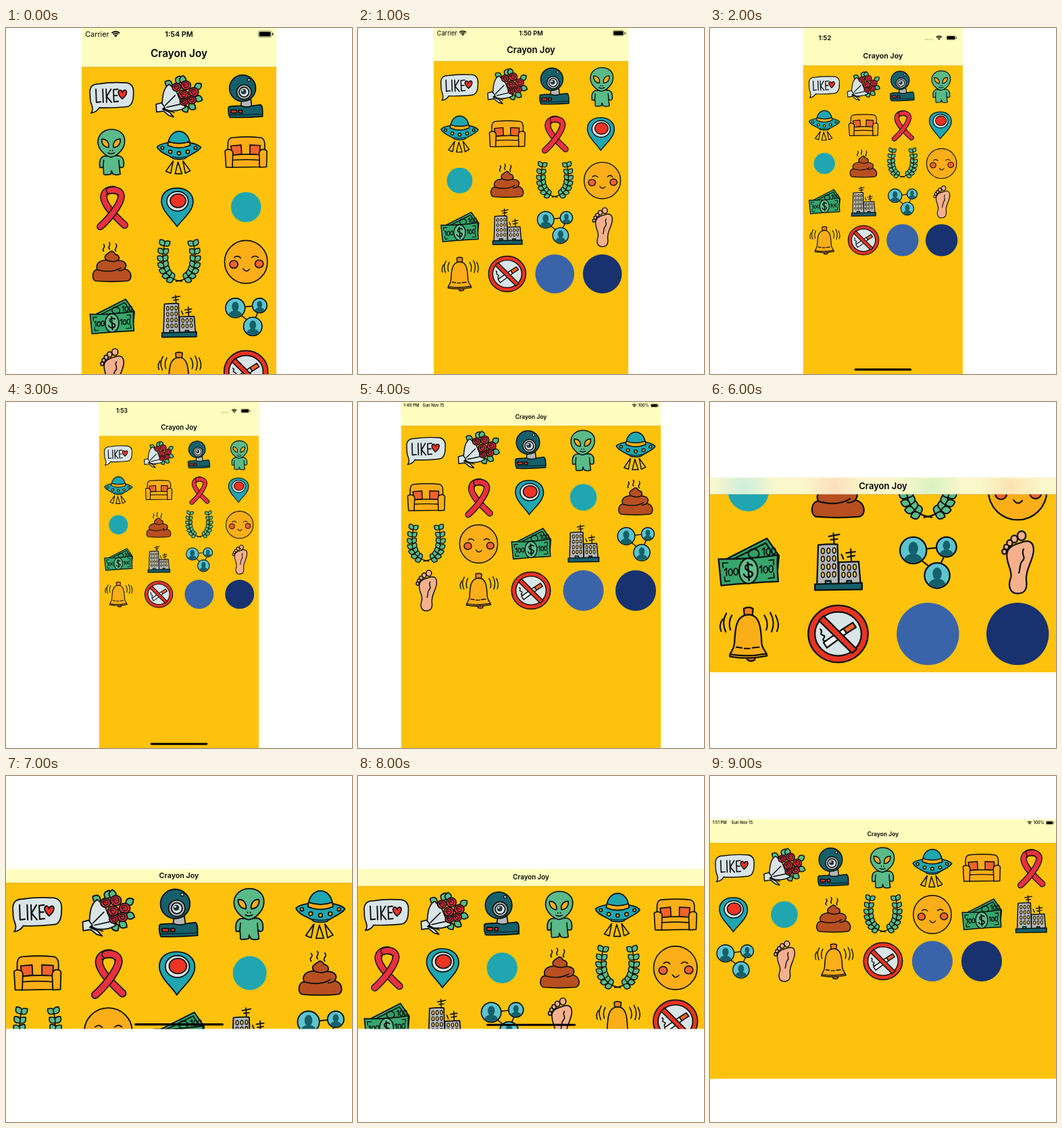
An HTML page with a canvas for the animation above (10 s loop, 512 by 512 pixels).

```html
<!DOCTYPE html>
<html lang="en">
<head>
<meta charset="utf-8">
<title>Doodle grid on several devices</title>
<style>
  html, body { margin: 0; width: 100%; height: 100%; overflow: hidden; background: #fff; }
  canvas { display: block; width: 512px; height: 512px; }
</style>
</head>
<body>
<canvas id="stage" width="512" height="512"></canvas>
<script>
const ctx = document.getElementById('stage').getContext('2d');
const TITLE = 'Crayon Joy';
const INK = '#0b0f0e', PAPER = '#fec20c', BAR = '#fffebf';
const WHITE = '#d8e4e6', RED = '#e8303f', TEAL = '#1fa6b0', DARK = '#15606a',
      GREEN = '#5aba88', ORANGE = '#fcae18', RUST = '#f2632b', GREY = '#b4b6b8';

// ---- Path helpers: every icon lives in a box from -50 to 50 ----
const oval = (x, y, rx, ry = rx) =>
  `M${x - rx} ${y}a${rx} ${ry} 0 1 0 ${2 * rx} 0a${rx} ${ry} 0 1 0 ${-2 * rx} 0z`;

function leaf(x, y, angle, length = 15, width = 11) {
  const c = Math.cos(angle), s = Math.sin(angle);
  const at = (u, v) => `${x + u * c - v * s} ${y + u * s + v * c}`;
  return `M${at(0, 0)}Q${at(length / 2, -width)} ${at(length, 0)}Q${at(length / 2, width)} ${at(0, 0)}z`;
}

// A shape is [path, fill, stroke colour, stroke width].
const line = (d, width = 2.2) => [d, null, INK, width];
const flat = (d, fill) => [d, fill, null];
const disc = (color, r) => [flat(oval(0, 0, r), color)];
const band = (d, color, width) => [line(d, width + 4), [d, null, color, width]];

const rose = (x, y, r) => [
  [oval(x, y, r, r * .92), RED],
  line(`M${x - r * .6} ${y}c0 ${-r * .8} ${r * 1.2} ${-r * .7} ${r * 1.1} 0c0 ${r * .7} ${-r} ${r * .6} ${-r * .9} 0q${r * .3} ${-r * .4} ${r * .5} 0`, 1.8)
];
const person = (x, y, r) => [
  [oval(x, y, r), '#5cc4ce'],
  flat(`M${x - r * .68} ${y + r * .66}Q${x - r * .5} ${y + r * .25} ${x} ${y + r * .25}T${x + r * .68} ${y + r * .66}Q${x} ${y + r * 1.2} ${x - r * .68} ${y + r * .66}z`, DARK),
  flat(oval(x, y - r * .15, r * .36, r * .5), DARK)
];
const hundred = (x, y) => line(`M${x - 9} ${y - 3}l3 -3v11${oval(x, y, 3, 5)}${oval(x + 8, y - 1, 3, 5)}`, 1.8);

function laurel() {
  const shapes = [];
  for (const side of [-1, 1]) {
    shapes.push(line(`M${-6 * side} 40Q${44 * side} 34 ${30 * side} -36`));
    for (let i = 0; i < 7; i++) {
      const t = .2 + i * .13, q = 1 - t;
      const x = -6 * q * q + 88 * t * q + 30 * t * t;
      const y = 40 * q * q + 68 * t * q - 36 * t * t;
      const heading = Math.atan2(2 * (q * -6 + t * -70), 2 * (q * 50 + t * -14));
      for (const turn of [-.75, .75]) {
        const a = heading + turn;
        shapes.push([leaf(x * side, y, side > 0 ? a : Math.PI - a), GREEN, INK, 2]);
      }
    }
  }
  return shapes;
}

function windows(x, y, columns, rows, dx, dy) {
  let d = '';
  for (let r = 0; r < rows; r++)
    for (let c = 0; c < columns; c++) d += oval(x + c * dx, y + r * dy - c * .4, 2.4, 4);
  return [d, '#eec968', INK, 1.6];
}

const icons = [
  // speech bubble
  [
    ['M-45 -6C-47 -22 -40 -28 -26 -28C-8 -31 14 -31 30 -30C42 -28 45 -20 44 -8C44 8 40 18 30 19C10 21 -8 22 -26 21C-30 28 -36 31 -43 32C-38 26 -40 20 -42 14C-45 8 -45 0 -45 -6z', WHITE],
    line('M-33 -17L-32 10L-23 9M-19 -17L-18 10M-12 -17L-11 10M-2 -17L-11 -2L-1 10M12 -17L3 -16L4 9L13 8M4 -4L11 -4', 2.6),
    ['M21 3C14 -4 11 -10 14 -14C17 -17 21 -14 21 -10C23 -16 29 -17 30 -11C30 -5 25 0 21 3z', '#ee3424']
  ],
  // bouquet
  [
    ...[[-4, -28, -1.2], [-14, -24, -2.6], [8, -28, -1.6], [32, -18, -.6], [32, 0, .3], [20, 14, .6], [8, 16, 1]]
      .map(([x, y, a]) => [leaf(x, y, a, 17, 13), GREEN]),
    ['M-35 18C-34 0 -33 -20 -20 -27L-6 -14L4 10L14 20C2 28 -10 28 -24 27z', WHITE],
    ['M-47 14L-36 11L-29 20L-34 24L-20 30L-11 40L-21 37L-32 28L-46 30z', WHITE],
    line('M-28 16L-8 -4M-25 20L2 14M-32 23L-10 31'),
    ...rose(-5, -21, 9), ...rose(14, -25, 10), ...rose(30, -11, 10),
    ...rose(9, -6, 10), ...rose(26, 5, 9), ...rose(10, 9, 8)
  ],
  // webcam
  [
    ['M-9 5L10 4L12 20L-11 20z', GREY],
    [oval(-7, -19, 27), DARK],
    [oval(-4, -11, 15), GREY],
    [oval(-4, -11, 10), WHITE],
    flat(oval(-5, -12, 5.5), '#27343a'), flat(oval(-7, -14, 2), WHITE),
    [oval(6, -36, 3), GREY, INK, 1.5],
    ['M-36 22C-37 17 -28 18 -10 17Q0 22 13 17L30 15C35 18 34 28 34 39Q0 42 -33 41Q-37 34 -36 22z', DARK],
    ['M-31 26l12 0v6l-12 0z', '#ee3424'], ['M-15 26h7v6h-7z', '#ee3424'],
    line('M-34 36Q0 36 32 34', 1.4)
  ],
  // alien
  [
    ['M-17 8C-27 12 -26 24 -25 31Q-20 33 -18 29L-17 42Q-19 47 -10 46L-2 45L-1 38L2 45Q10 48 17 45L15 29Q20 34 24 29C25 18 24 10 14 7z', GREEN],
    ['M-2 10C-14 8 -28 -6 -29 -20C-29 -38 -15 -47 -1 -47C14 -47 27 -38 26 -22C26 -8 12 8 -2 10z', GREEN],
    ['M-7 -10C-16 -10 -22 -18 -21 -27C-12 -28 -5 -20 -7 -10z', ORANGE],
    ['M3 -10C1 -20 8 -28 17 -27C18 -18 13 -10 3 -10z', ORANGE],
    line('M-8 1Q-2 5 5 1M-4 -4v1M1 -4v1M-17 16L-18 29M14 16L15 29')
  ],
  // flying saucer
  [
    ['M-12 18L-27 39L-17 43z', PAPER], ['M-2 20L-8 44L6 44z', PAPER], ['M8 18L13 43L23 38z', PAPER],
    ['M-45 -11C-34 -24 30 -26 45 -10C40 0 18 6 12 13Q0 16 -12 13C-18 6 -40 2 -45 -11z', TEAL],
    ['M-22 -16C-22 -34 -10 -43 0 -43C12 -43 22 -32 22 -16Q0 -6 -22 -16z', TEAL],
    ['M-22 -22Q0 -14 22 -22L23 -14Q0 -4 -23 -14z', ORANGE],
    [[-34, 34].map(x => oval(x, -9, 3)).join('') + [-18, 18].map(x => oval(x, -1, 3.5)).join('') + oval(0, 2, 3.5), PAPER],
    line('M-14 9Q0 13 14 9', 1.6)
  ],
  // sofa
  [
    ['M-37 0C-38 -20 -38 -29 -28 -30Q4 -33 30 -30C40 -28 39 -16 38 2L34 20L-34 20z', ORANGE],
    ['M-31 -13L-10 -15L-9 4L-28 6z', RUST], ['M8 -15L29 -14L28 6L8 4z', RUST],
    ['M-28 6Q0 3 28 5L28 30L-28 31z', ORANGE], line('M-28 16Q0 14 28 16'),
    ['M-43 -3C-38 -8 -27 -6 -27 2L-28 31L-41 31z', ORANGE],
    ['M27 2C28 -8 40 -8 43 -2L42 30L28 31z', ORANGE]
  ],
  // ribbon
  [
    ...band('M26 37C10 22 -16 -2 -17 -20C-16 -34 -4 -37 4 -36', RED, 11),
    ...band('M-24 40C-10 28 18 -4 19 -22C18 -34 6 -37 -5 -34', RED, 11),
    line('M-12 -25Q2 -32 14 -24', 1.6)
  ],
  // map pin
  [
    ['M-4 40C-14 24 -36 8 -36 -12C-36 -30 -22 -39 -4 -39C16 -39 29 -27 29 -11C29 8 8 24 -4 40z', TEAL],
    [oval(-3, -12, 22, 20), WHITE], [oval(-2, -13, 16, 14), '#ee3424']
  ],
  disc(TEAL, 31),
  // swirl
  [
    ['M-30 16C-35 4 -26 -3 -12 -4C-20 -14 -6 -18 -2 -22Q4 -22 6 -16C16 -14 16 -6 12 -3C28 -3 32 6 26 14C42 18 42 37 32 39Q0 42 -34 39C-43 34 -40 16 -30 16z', '#b84f20'],
    line('M-12 -4Q0 2 12 -3M-30 16Q0 24 18 12M26 14Q22 18 14 18'),
    line('M-17 -22c-6 -6 6 -7 0 -14M-5 -26c-6 -5 5 -8 -1 -14M8 -22c-6 -6 6 -7 0 -15')
  ],
  laurel(),
  // smiling face
  [
    [oval(0, 0, 44), ORANGE],
    [oval(-25, 5, 8.5, 8), RUST], [oval(27, 4, 8.5, 8), RUST],
    line('M-24 -9Q-17 -15 -11 -8M12 -9Q19 -15 25 -9M-6 14Q0 23 7 15')
  ],
  // banknotes
  [
    ['M-37 -3L28 -36L46 -10L44 12L-20 18z', '#2f9f66'],
    line('M-24 -4L26 -29L38 -11'), line(oval(8, -13, 8, 7)), hundred(30, -16),
    ['M-45 -5Q0 -4 44 -11Q43 10 45 29Q0 31 -41 35Q-43 14 -45 -5z', '#35a76c'],
    [oval(0, 13, 14, 19), '#63bd8c'],
    line('M6 5C2 1 -7 4 -4 10C0 15 8 13 6 19C3 25 -5 23 -7 18M-1 0L1 27', 2.6),
    hundred(-27, 15), hundred(26, 11),
    line('M-38 8L-39 1L-31 1M31 -3L38 -4L38 4M-36 22L-35 29L-28 28M30 24L39 23L38 16', 1.8)
  ],
  // buildings
  [
    line('M-6 -27L-7 -44M-14 -39L2 -42M-11 -34L-1 -35M20 -1L19 -20M12 -14L26 -16M14 -8L25 -10'),
    line('M5 -12L8 -5'),
    ['M-30 -26Q-14 -28 -1 -27L1 36L-32 37z', GREY],
    ['M1 0L31 -1L34 35L1 36z', GREY],
    windows(-23, -17, 3, 4, 8.5, 12), windows(8, 8, 3, 2, 8.5, 11),
    ['M-19 38v-10h8v10z', TEAL], ['M13 37v-9h7v9z', TEAL],
    ['M-35 33L36 31L36 41L-35 42z', DARK]
  ],
  // network
  [
    line('M-4 -20L14 -22M-10 -3L3 7M24 -8L19 3'),
    ...person(-22, -18, 20), ...person(28, -23, 15), ...person(14, 20, 19)
  ],
  // foot
  [
    ['M-16 -14C-18 2 -8 10 -10 22C-16 38 -10 47 0 47C11 47 15 40 13 26C12 10 22 0 24 -16C25 -32 16 -34 6 -30C-4 -27 -14 -24 -16 -14z', '#f6b08c'],
    line('M9 -20C4 -12 14 -8 7 -2C3 2 4 10 2 16'),
    ...[[6, -40, 7], [-5, -35, 5.5], [-12, -29, 4.6], [-17, -23, 4], [-20, -16, 3.8]]
      .map(([x, y, r]) => [oval(x, y, r * .9, r), '#f6b08c'])
  ],
  // bell
  [
    [oval(4, 37, 6, 4), RUST],
    ['M-6 -28L-7 -38Q0 -42 7 -38L6 -28z', '#f0821e'],
    ['M-21 14C-20 -8 -19 -28 0 -29C17 -29 19 -10 20 14C21 24 28 27 28 33Q0 39 -28 34C-29 28 -22 26 -21 14z', ORANGE],
    line('M-18 20l8 1M-6 22l8 0M6 21l10 -1M-26 31Q0 35 26 30'),
    line('M-25 -28Q-31 -17 -27 -6M-33 -31Q-41 -18 -34 -3M-39 -22Q-45 -12 -41 -4M24 -28Q31 -17 27 -6M33 -32Q41 -18 35 -3M41 -28Q48 -14 43 -4')
  ],
  // no smoking
  [
    [oval(0, 0, 45, 43), '#e63422'], [oval(0, 0, 35, 33), WHITE],
    ['M-22 13L8 -8L13 -1L-17 21z', '#f5f8f8'], ['M8 -8L22 -17L27 -10L13 -1z', RUST],
    line('M-19 11c-10 -2 4 -7 -4 -9c-7 -2 2 -6 -4 -9'),
    ['M-29 -20L-22 -27L28 23L21 29z', '#e63422']
  ],
  disc('#3a64a9', 47),
  disc('#17326f', 47)
];

function drawIcon(shapes, x, y, size) {
  ctx.save();
  ctx.translate(x, y);
  ctx.scale(size / 100, size / 100);
  ctx.lineCap = ctx.lineJoin = 'round';
  for (const [d, fill, stroke = INK, width = 2.3] of shapes) {
    const path = new Path2D(d);
    if (fill) { ctx.fillStyle = fill; ctx.fill(path); }
    if (stroke) { ctx.strokeStyle = stroke; ctx.lineWidth = width; ctx.stroke(path); }
  }
  ctx.restore();
}

// ---- Device chrome, in points ----
function label(text, x, y, size, weight = 400, align = 'center') {
  ctx.font = `${weight} ${size}px Inter, sans-serif`;
  ctx.textAlign = align;
  ctx.textBaseline = 'middle';
  ctx.fillStyle = '#000';
  ctx.fillText(text, x, y + .5);
}
function pill(x, y, w, h, r = h / 2) {
  ctx.beginPath();
  ctx.roundRect(x, y, w, h, r);
}
function battery(x, y) {
  ctx.strokeStyle = 'rgba(0,0,0,.4)';
  ctx.lineWidth = 1;
  pill(x, y - 5.5, 22, 11, 3); ctx.stroke();
  ctx.fillStyle = '#000';
  pill(x + 1.5, y - 4, 19, 8, 1.8); ctx.fill();
  pill(x + 23, y - 2, 1.5, 4, .7); ctx.fill();
}
function wifi(x, y) {
  ctx.strokeStyle = ctx.fillStyle = '#000';
  ctx.lineWidth = 2;
  ctx.lineCap = 'butt';
  for (const r of [6, 9.2]) {
    ctx.beginPath(); ctx.arc(x, y + 5, r, -2.36, -.78); ctx.stroke();
  }
  ctx.beginPath(); ctx.moveTo(x, y + 5); ctx.arc(x, y + 5, 3.6, -2.36, -.78); ctx.fill();
}

const status = {
  classic({ w, time }) {
    label('Carrier', 6, 10, 12, 400, 'left');
    wifi(56, 10);
    label(time, w / 2, 10, 12, 600);
    battery(w - 30, 10);
  },
  notch({ w, time }) {
    const inset = w > 400 ? 0 : 8;
    label(time, 59 - inset, 23, 15, 600);
    ctx.fillStyle = 'rgba(0,0,0,.3)';
    for (let i = 0; i < 4; i++) { pill(w - 97 + inset + i * 5, 25.5, 3, 3); ctx.fill(); }
    wifi(w - 64 + inset, 23);
    battery(w - 47 + inset, 23);
  },
  tablet({ w, time }) {
    label(time, 7, 10.5, 12, 500, 'left');
    label('Sun Nov 15', 63, 10.5, 12, 500, 'left');
    wifi(w - 78, 10.5);
    label('100%', w - 51, 10.5, 12, 500);
    battery(w - 30, 10.5);
  }
};

const screens = [
  { w: 320, h: 568, nav: 64, titleY: 42, bar: 'classic', time: '1:54 PM' },
  { w: 375, h: 667, nav: 64, titleY: 42, bar: 'classic', time: '1:50 PM' },
  { w: 375, h: 812, nav: 88, titleY: 66, bar: 'notch', time: '1:52', home: 134 },
  { w: 414, h: 896, nav: 88, titleY: 66, bar: 'notch', time: '1:53', home: 148 },
  { w: 768, h: 1024, nav: 70, titleY: 45, bar: 'tablet', time: '1:49 PM' },
  { w: 568, h: 320, nav: 32, titleY: 16 },
  { w: 667, h: 375, nav: 32, titleY: 16, atEnd: true },
  { w: 812, h: 375, nav: 32, titleY: 16, home: 209 },
  { w: 896, h: 414, nav: 44, titleY: 22, home: 231 },
  { w: 1024, h: 768, nav: 70, titleY: 45, bar: 'tablet', time: '1:51 PM' }
];

// Colours of scrolled icons shining through the bar: [centre as share of width, colour]
const glows = [[.1, '160,230,240'], [.36, '255,195,170'], [.64, '185,235,185'], [.87, '255,205,150']];

function drawGrid({ w, h, nav, atEnd }) {
  const gap = 10, size = w < 500 ? 80 : 128, step = size + gap;
  const columns = Math.floor((w - gap) / step);
  const stepX = (w - 2 * gap - size) / (columns - 1);
  const contentEnd = nav + gap + Math.ceil(icons.length / columns) * step;
  const top = nav + gap + size / 2 - (atEnd ? contentEnd - h : 0);
  icons.forEach((icon, i) => drawIcon(icon,
    gap + size / 2 + (i % columns) * stepX, top + Math.floor(i / columns) * step, size));
}

function drawScreen(screen) {
  const { w, h, nav, titleY, bar, home, atEnd } = screen;
  const scale = 512 / Math.max(w, h);
  ctx.fillStyle = '#fff';
  ctx.fillRect(0, 0, 512, 512);
  ctx.save();
  ctx.translate(256 - w * scale / 2, 256 - h * scale / 2);
  ctx.scale(scale, scale);
  ctx.beginPath();
  ctx.rect(0, 0, w, h);
  ctx.clip();

  ctx.fillStyle = PAPER;
  ctx.fillRect(0, 0, w, h);
  drawGrid(screen);

  ctx.fillStyle = atEnd ? '#faf8cb' : BAR;
  ctx.fillRect(0, 0, w, nav);
  if (atEnd) for (const [share, rgb] of glows) {
    const x = w * share, glow = ctx.createRadialGradient(x, nav / 2, 0, x, nav / 2, 62);
    glow.addColorStop(0, `rgba(${rgb},.5)`);
    glow.addColorStop(1, `rgba(${rgb},0)`);
    ctx.fillStyle = glow;
    ctx.fillRect(0, 0, w, nav);
  }
  ctx.fillStyle = 'rgba(0,0,0,.25)';
  ctx.fillRect(0, nav, w, .6);
  label(TITLE, w / 2, titleY, 17, 600);
  if (bar) status[bar](screen);
  if (home) {
    ctx.fillStyle = '#000';
    pill((w - home) / 2, h - 13, home, 5);
    ctx.fill();
  }
  ctx.restore();
}

let shown = -1;
function tick() {
  const current = Math.floor(performance.now() / 1000) % screens.length;
  if (current !== shown) drawScreen(screens[shown = current]);
  requestAnimationFrame(tick);
}
tick();
</script>
</body>
</html>
```
